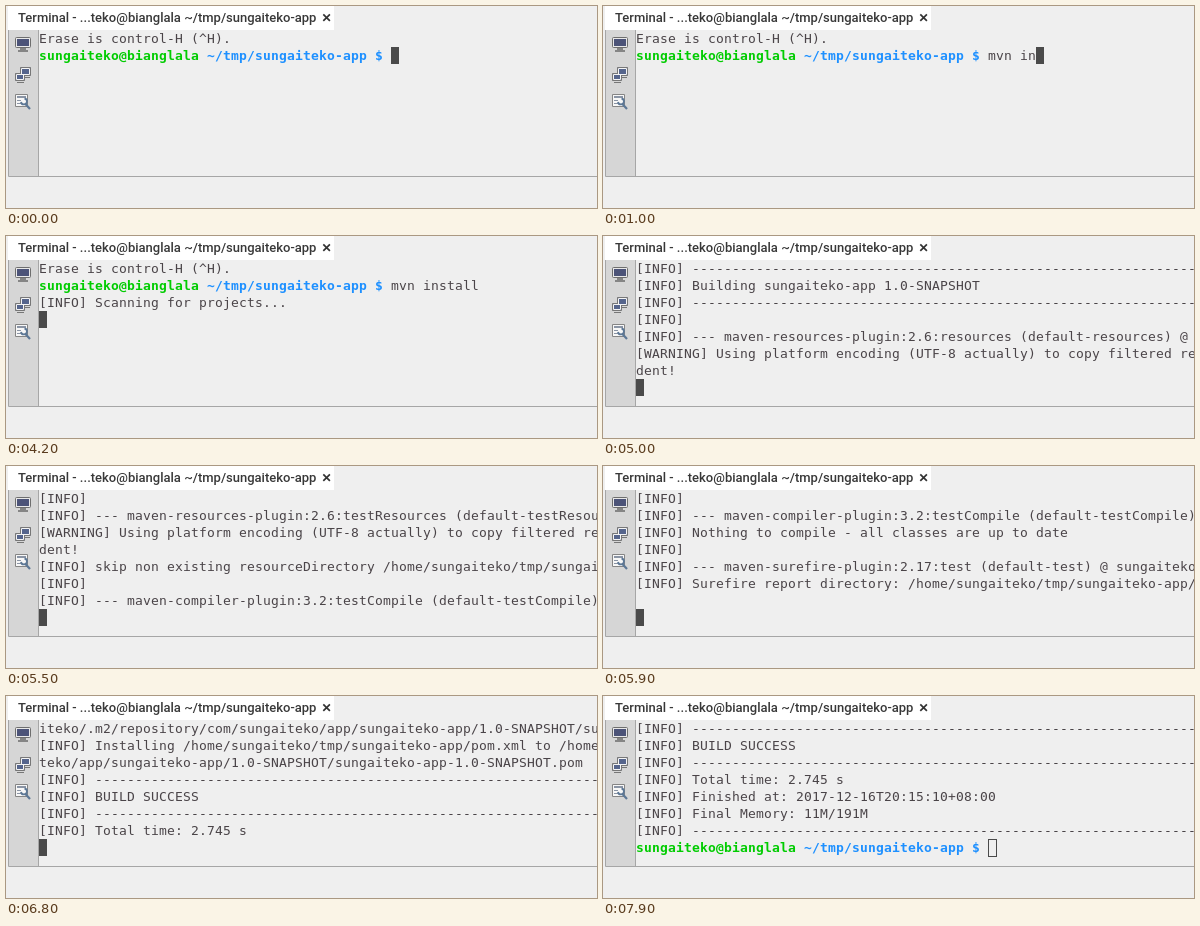
Recreate the animation shown at these times as an HTML page. Size 591 by 202 pixels, loop 8100 ms.

```html
<!DOCTYPE html>
<html lang="en">
<head>
<meta charset="utf-8">
<title>Terminal</title>
<style>
  html, body { margin: 0; width: 100%; height: 100%; overflow: hidden; background: #efefef; }
  #stage { position: relative; width: 591px; height: 202px; overflow: hidden; }
  #stage > * { position: absolute; }
  svg { left: 0; top: 0; }
  #title { left: 12px; top: 0; font: 500 13px/24px Roboto, sans-serif; color: #383838; white-space: pre; }
  /* every glyph sits in an 8px cell */
  #screen { left: 33px; top: 24px; margin: 0; color: #4a4448;
    font: 13px/17px "DejaVu Sans Mono", monospace; letter-spacing: calc(8px - 1ch); }
  .user { color: #00cc00; }
  .path { color: #1e90ff; }
  #cursor { box-sizing: border-box; width: 8px; height: 17px; background: #4a4a4a; }
  #cursor.hollow { width: 9px; height: 18px; background: none; border: 1px solid #4a4a4a; }
</style>
</head>
<body>
<div id="stage">
  <svg width="591" height="202">
    <path fill="#fff" d="M2 0h326v24H2z"/>
    <path fill="#d6d6d6" d="M2 24h31v146H2z"/>
    <path fill="none" stroke="#a6a6a6" d="M2.5 24v146.5H591M32.5 24v146"/>
    <path fill="none" stroke="#333" stroke-width="1.7" d="M317.3 8.3l6.6 6.6m0-6.6l-6.6 6.6"/>
    <!-- single screen -->
    <rect x="9.5" y="31.5" width="15" height="10" rx="1" fill="#e8e8e8" stroke="#6e6e6e"/>
    <path fill="#4c5378" d="M11 33h12v7H11z"/>
    <path fill="#858585" d="M14 42h6v2h2v2H12v-2h2z"/>
    <!-- two screens -->
    <g fill="#56658c" stroke="#f4f4f4">
      <path stroke="#777" d="M14.5 61.5h10v8h-10zM9.5 67.5h9v7h-9z"/>
      <path d="M15.5 62.5h8v6h-8zM10.5 68.5h7v5h-7z"/>
    </g>
    <path fill="#777" d="M18 71h6v1h-6zM11 76h7v1h-7z"/>
    <!-- sheet with wrench -->
    <path fill="#f7f7f7" stroke="#858585" d="M9.5 88.5h12v12h-12z"/>
    <path fill="#8b95a5" d="M11 90h9v2h-9zM11 94h4v1h-4zM11 97h4v1h-4z"/>
    <path fill="none" stroke="#5d7896" stroke-width="2.2" d="M24 103l-5-5.5"/>
    <path fill="none" stroke="#5d7896" stroke-width="1.8" d="M18.5 92.5a3 3 0 1 1-3.5 3.5"/>
  </svg>
  <div id="title">Terminal - ...teko@bianglala ~/tmp/sungaiteko-app</div>
  <pre id="screen"></pre>
  <div id="cursor"></div>
</div>
<script>
const LOOP = 8100, COLS = 107, ROWS = 8, CELL = 8, LINE = 17, LEFT = 33, TOP = 24;

const user = 'sungaiteko', app = user + '-app', home = '/home/' + user;
const project = `${home}/tmp/${app}`;
const login = user + '@bianglala', path = ` ~/tmp/${app} $`, prompt = login + path + ' ';

const info = (text = '') => `[INFO] ${text}\n`;
const rule = info('-'.repeat(72)), testRule = '-'.repeat(55) + '\n';
const plugin = (name, goal, id) => info() + info(`--- maven-${name}:${goal} (default-${id}) @ ${app} ---`);
const warning = '[WARNING] Using platform encoding (UTF-8 actually) to copy filtered resources, ' +
  'i.e. build is platform dependent!\n';
const skip = dir => info(`skip non existing resourceDirectory ${project}/src/${dir}/resources`);
const upToDate = info('Nothing to compile - all classes are up to date');
const install = (file, ext) => info(`Installing ${project}/${file} to ${home}/.m2/repository/com/` +
  `${user}/app/${app}/1.0-SNAPSHOT/${app}-1.0-SNAPSHOT.${ext}`);
const tests = 'Tests run: 1, Failures: 0, Errors: 0, Skipped: 0';

// [time in ms, text printed at that time]
const output = [
  [0, 'Erase is control-H (^H).\n' + prompt],
  [300, 'm'], [400, 'v'], [700, 'n'], [900, ' '], [1000, 'in'], [1100, 's'],
  [1300, 'ta'], [1500, 'l'], [1600, 'l'], [2100, '\n'],
  [4200, info('Scanning for projects...')],
  [4400, info() + rule + info(`Building ${app} 1.0-SNAPSHOT`) + rule],
  [4600, info()],
  [4700, info(`--- maven-resources-plugin:2.6:resources (default-resources) @ ${app} ---`)],
  [5000, warning],
  [5100, skip('main') + plugin('compiler-plugin', '3.2:compile', 'compile')],
  [5400, upToDate + plugin('resources-plugin', '2.6:testResources', 'testResources')],
  [5500, warning + skip('test') + plugin('compiler-plugin', '3.2:testCompile', 'testCompile')],
  [5700, upToDate + plugin('surefire-plugin', '2.17:test', 'test')],
  [5900, info(`Surefire report directory: ${project}/target/surefire-reports`) + '\n'],
  [6000, testRule + ' T E S T S\n' + testRule],
  [6300, `Running com.${user}.app.AppTest\n`],
  [6700, `${tests}, Time elapsed: 0.016 sec - in com.${user}.app.AppTest\n\nResults :\n\n${tests}\n\n` +
    plugin('jar-plugin', '2.5:jar', 'jar')],
  [6800, plugin('install-plugin', '2.5.2:install', 'install') +
    install(`target/${app}-1.0-SNAPSHOT.jar`, 'jar') + install('pom.xml', 'pom') +
    rule + info('BUILD SUCCESS') + rule + info('Total time: 2.745 s')],
  [6900, info('Finished at: 2017-12-16T20:15:10+08:00') + info('Final Memory: 11M/191M') + rule],
  [7000, prompt]
];

const screen = document.getElementById('screen'), cursor = document.getElementById('cursor');
const wrap = line => line.match(new RegExp(`.{1,${COLS}}`, 'g')) || [''];
const paint = row => row.replace(login + path,
  `<b class="user">${login}</b><b class="path">${path}</b>`);
let shown = -1;

function draw(now) {
  const t = now % LOOP;
  const count = output.filter(([at]) => at <= t).length;
  if (count !== shown) {
    shown = count;
    const text = output.slice(0, count).map(part => part[1]).join('');
    const rows = text.split('\n').flatMap(wrap).slice(-ROWS);
    screen.innerHTML = rows.map(paint).join('\n');
    cursor.style.left = LEFT + CELL * rows.at(-1).length + 'px';
    cursor.style.top = TOP + LINE * (rows.length - 1) + 'px';
  }
  cursor.className = t >= 7900 ? 'hollow' : '';
}

const start = performance.now();
function tick() {
  draw(performance.now() - start);
  requestAnimationFrame(tick);
}
tick();
</script>
</body>
</html>
```
